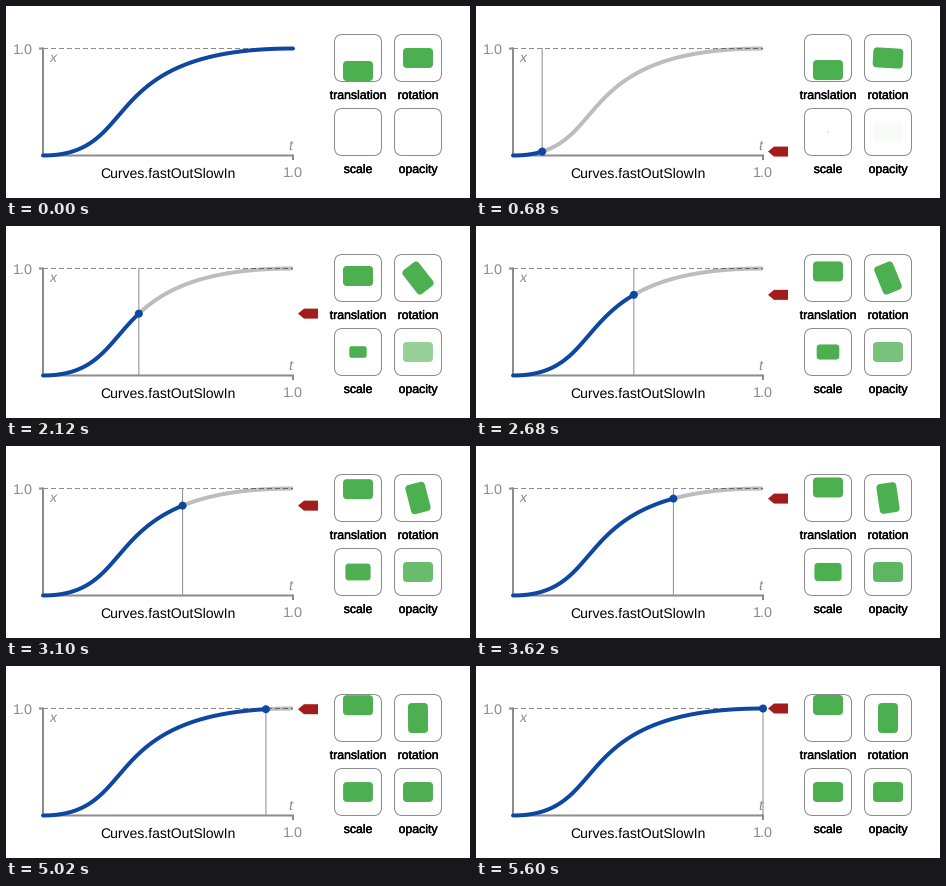
A matplotlib script for the animation above (5620 ms loop, 464 px wide and 192 px high).

```python
import numpy as np
import matplotlib.pyplot as plt
from matplotlib.animation import FuncAnimation
from matplotlib.patches import Circle, FancyBboxPatch, Polygon
from matplotlib.patheffects import withStroke
from matplotlib.transforms import Affine2D

plt.rcParams["font.family"] = "Liberation Sans"
plt.rcParams["text.hinting"] = "none"
plt.rcParams["path.snap"] = False

W, H, DPI = 464, 192, 64
TICK, TICKS = 20, 281
STEPS = 120
PT = 72 / DPI  # points per pixel

BLUE, RED, GREEN, GREY = "#0d47a1", "#a31c1c", "#4caf50", "#8c8c8c"
LEFT, RIGHT, TOP, BOTTOM = 37, 287, 42.5, 149.5

fig = plt.figure(figsize=(W / DPI, H / DPI), dpi=DPI, facecolor="white")
ax = fig.add_axes([0, 0, 1, 1])
ax.set_xlim(0, W)
ax.set_ylim(H, 0)
ax.axis("off")


def line(xs, ys, width, color, **kw):
    return ax.plot(xs, ys, lw=width * PT, color=color, **kw)[0]


def label(x, y, text, px, color="black", **kw):
    ax.text(x, y, text, fontsize=px * PT, color=color,
            ha="center", va="baseline", **kw)


def rounded(x, y, w, h, r, **kw):
    style = f"round,pad=0,rounding_size={r}"
    return ax.add_patch(FancyBboxPatch((x, y), w, h, boxstyle=style, **kw))


# Curve: cubic Bezier (0.4, 0, 0.2, 1)
s = np.linspace(0, 1, 241)
curve_t = 1.2 * (1 - s) ** 2 * s + 0.6 * (1 - s) * s ** 2 + s ** 3
curve_v = 3 * s ** 2 - 2 * s ** 3


def to_x(t):
    return LEFT + (RIGHT - LEFT) * t


def to_y(v):
    return BOTTOM + (TOP - BOTTOM) * v


curve_x, curve_y = to_x(curve_t), to_y(curve_v)

# Axes
line([LEFT, LEFT, RIGHT], [TOP - 1, BOTTOM, BOTTOM], 2, GREY, zorder=1,
     solid_joinstyle="miter", solid_capstyle="butt")
line([33, LEFT], [TOP, TOP], 2, GREY, zorder=1, solid_capstyle="butt")
line([RIGHT, RIGHT], [BOTTOM - 1, 154], 2, GREY, zorder=1, solid_capstyle="butt")
line([LEFT, RIGHT], [TOP, TOP], 1, GREY, zorder=1, linestyle=(0, (5, 3)))

label(16.8, 48, "1.0", 14.4, GREY)
label(287, 171, "1.0", 14.4, GREY)
label(47, 56, "x", 14, GREY, style="italic")
label(284.5, 144, "t", 14.4, GREY, style="italic")
label(161.7, 172, "Curves.fastOutSlowIn", 13.95)

# Moving parts of the graph
marker = line([], [], 1, GREY, zorder=2)
rest = line([], [], 4, "black", alpha=0.26, zorder=3, solid_capstyle="butt")
done = line([], [], 4, BLUE, zorder=4, solid_capstyle="round")
dot = ax.add_patch(Circle((LEFT, BOTTOM), 4, fc=BLUE, ec="none", zorder=5))
arrow_shape = np.array([(292, 0), (298, -5), (312, -5), (312, 5), (298, 5)])
arrow = ax.add_patch(Polygon(arrow_shape, fc=RED, ec="none", zorder=5))

# Sample tiles
centers = {"translation": (352, 52), "rotation": (412, 52),
           "scale": (352, 126), "opacity": (412, 126)}
medium = [withStroke(linewidth=0.4 * PT, foreground="black")]
cards = {}
for name, (cx, cy) in centers.items():
    rounded(cx - 23.5, cy - 23.5, 47, 47, 8, fc="none", ec=GREY, lw=PT, zorder=2)
    cards[name] = rounded(-15, -10, 30, 20, 4, fc=GREEN, ec="none", zorder=3)
    label(cx, cy + 41, name, 12.3, path_effects=medium)


def place(name, transform, dy=0):
    cx, cy = centers[name]
    cards[name].set_transform(transform.translate(cx, cy + dy) + ax.transData)


def step_at(tick):
    # Three steps per seven ticks, held for 1, 5 and 1 ticks
    group, r = divmod(tick, 7)
    return 3 * group + (r > 0) + (r > 5)


def update(tick):
    t = step_at(tick) / STEPS
    v = np.interp(t, curve_t, curve_v)
    x, y = to_x(t), to_y(v)
    running = t > 0

    for part in (marker, rest, dot, arrow):
        part.set_visible(running)
    if running:
        past = curve_t <= t
        done.set_data(np.append(curve_x[past], x), np.append(curve_y[past], y))
        rest.set_data(np.append(x, curve_x[~past]), np.append(y, curve_y[~past]))
        marker.set_data([x, x], [TOP, BOTTOM])
        dot.center = x, y
        arrow.set_xy(arrow_shape + (0, y))
    else:
        done.set_data(curve_x, curve_y)

    place("translation", Affine2D(), 13 - 26 * v)
    place("rotation", Affine2D().rotate(v * np.pi / 2))
    place("scale", Affine2D().scale(max(v, 1e-4)))
    place("opacity", Affine2D())
    cards["scale"].set_visible(running)
    cards["opacity"].set_alpha(float(v))
    return ()


anim = FuncAnimation(fig, update, frames=TICKS, interval=TICK,
                     init_func=lambda: update(0), repeat=True, repeat_delay=0)
plt.show()
```
